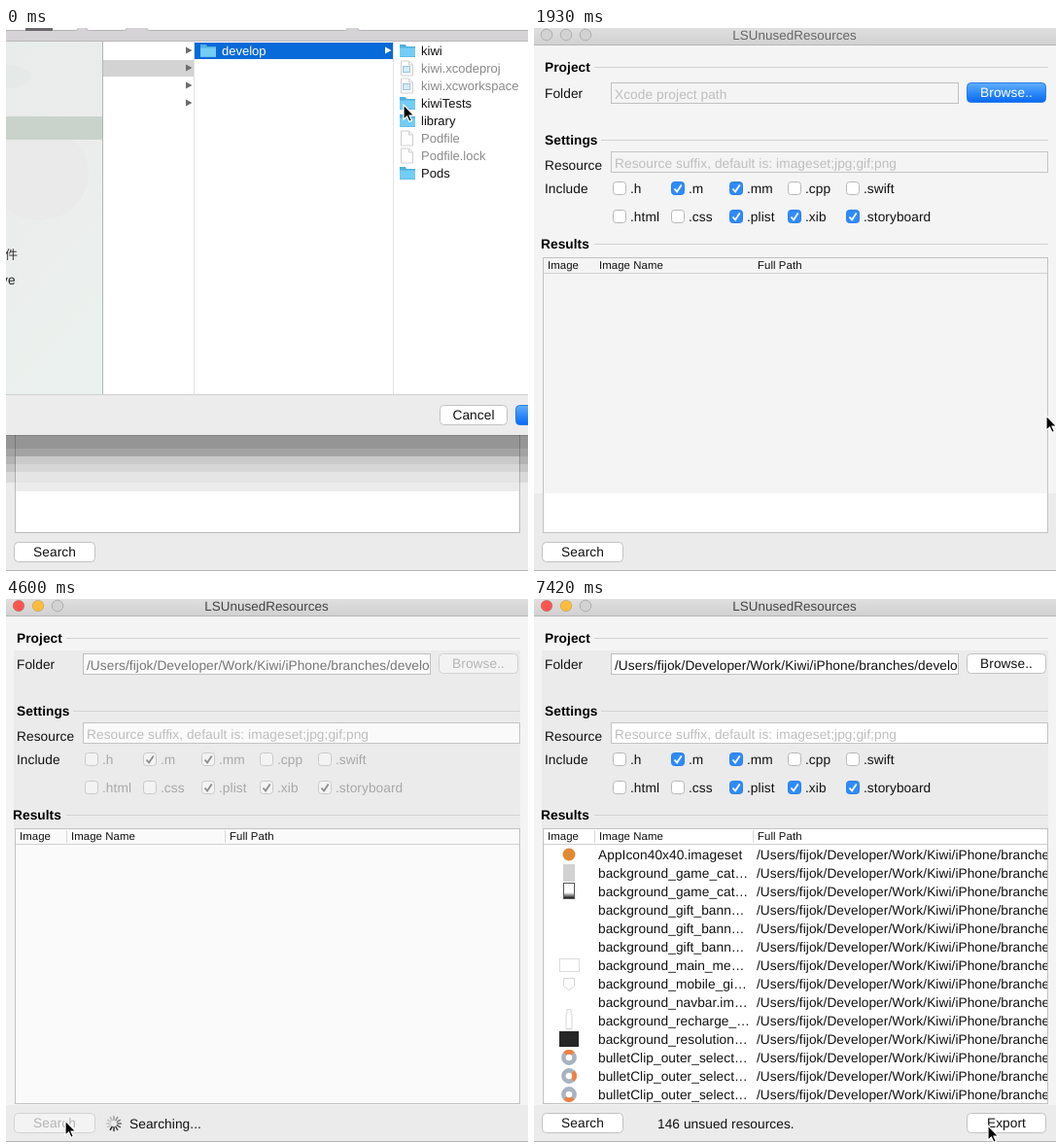
An HTML page that plays this animation: 537x559 px, repeating every 8000 ms.

```html
<!DOCTYPE html>
<html>
<head>
<meta charset="utf-8">
<style>
html, body { margin: 0; width: 100%; height: 100%; overflow: hidden; background: #f4f4f4; }
svg { display: block; }
text { font: 13.7px "Liberation Sans", Arial, sans-serif; letter-spacing: .07px; white-space: pre; text-rendering: geometricPrecision; }
.b { font-weight: bold; }
.s { font-size: 11.4px; }
.t { font-size: 13px; letter-spacing: 0; }
.w { font-size: 13.4px; }
.c { text-anchor: middle; }
.cjk { font-family: "Noto Sans CJK SC", "Noto Sans CJK", sans-serif; }
</style>
</head>
<body>
<svg id="stage" width="537" height="559" viewBox="0 0 537 559">
  <defs>
    <linearGradient id="bar" x2="0" y2="1"><stop stop-color="#e0dfe0"/><stop offset="1" stop-color="#d2d1d2"/></linearGradient>
    <linearGradient id="blue" x2="0" y2="1"><stop stop-color="#62b0fb"/><stop offset=".5" stop-color="#2f8bf9"/><stop offset="1" stop-color="#0a68f2"/></linearGradient>
    <linearGradient id="side" x2=".3" y2="1"><stop stop-color="#e8ecea"/><stop offset=".5" stop-color="#ebedec"/><stop offset="1" stop-color="#ebf1ee"/></linearGradient>
    <linearGradient id="fade" x2="0" y2="1"><stop offset=".6" stop-color="#fff"/><stop offset="1" stop-color="#000"/></linearGradient>
  </defs>
  <g id="scene"></g>
  <g id="spinner"></g>
  <path id="cursor" d="M0 0V15.2L3.5 12L6 17.4L8.4 16.3L6 11.1H10.8Z" stroke="#fff" stroke-width="1.2"/>
</svg>
<script>
const FRAME = 8000 / 54;
const PATH = "/Users/fijok/Developer/Work/Kiwi/iPhone/branches/develop";
const $ = id => document.getElementById(id);
const list = (items, fn) => items.map(fn).join("");

const rect = (x, y, w, h, fill, more = "") =>
  `<rect x="${x}" y="${y}" width="${w}" height="${h}" fill="${fill}" ${more}/>`;
const box = (x, y, w, h, fill, line, r = 0) =>
  rect(x + .5, y + .5, w - 1, h - 1, fill, `stroke="${line}" rx="${r}"`);
const text = (x, y, s, fill = "#111", cls = "") =>
  `<text x="${x}" y="${y}" fill="${fill}" class="${cls}">${s}</text>`;
const shape = (d, fill, more = "") => `<path d="${d}" fill="${fill}" ${more}/>`;
const disc = (x, y, r, fill, more = "") => `<circle cx="${x}" cy="${y}" r="${r}" fill="${fill}" ${more}/>`;
const clip = (x, y, w, h, s) =>
  `<svg x="${x}" y="${y}" width="${w}" height="${h}" viewBox="${x} ${y} ${w} ${h}">${s}</svg>`;

function button(x, y, w, label, look = "on") {
  const [fill, line, ink] = {
    on: ["#fff", "#c2c2c2", "#111"],
    off: ["#f3f3f3", "#d2d2d2", "#b4b4b4"],
    main: ["url(#blue)", "#2a7fe6", "#fff"]
  }[look];
  return box(x, y, w, 21, fill, line, 4) + text(x + w / 2, y + 15, label, ink, "c");
}

function check(x, y, label, on, off) {
  const blue = on && !off;
  return box(x, y, 14, 14, blue ? "#2f8bf9" : off ? "#f3f3f3" : "#fff", blue ? "#2a80ea" : off ? "#cacaca" : "#b8b8b8", 3) +
    (on ? shape(`M${x + 3.5} ${y + 7.5}l2.6 3l4.6-7`, "none", `stroke="${off ? "#8c8c8c" : "#fff"}" stroke-width="1.8"`) : "") +
    text(x + 18, y + 12, label, off ? "#a8a8a8" : "#111");
}

const folder = (x, y) =>
  shape(`M${x} ${y + 1}h6l1 2h9v11h-16z`, "#4fb0e0") + rect(x, y + 4.5, 16, 9, "#74cdf5");
const sheet = (x, y, mark) =>
  shape(`M${x + 2.5} ${y}h8l4 4v11h-12zM${x + 10.5} ${y}v4h4`, "#fff", `stroke="#cfcfcf"`) +
  (mark ? box(x + 4, y + 5, 8, 7, "#d9ebf6", "#9cc4dd") : "");
const arrow = (x, y, fill) => shape(`M${x} ${y - 3.5}v7l6.5-3.5z`, fill);

function dialog() {
  const files = ["kiwi", "kiwi.xcodeproj", "kiwi.xcworkspace", "kiwiTests", "library", "Podfile", "Podfile.lock", "Pods"];
  const shades = [[419, 14, "#959595"], [433, 8, "#a3a3a3"], [441, 8, "#b3b3b3"], [449, 8, "#c5c5c5"], [457, 11, "#d9d9d9"], [468, 91, "#eaebea"]];
  return rect(0, 0, 537, 14, "#d5d3d5") +
    list([[-9, 84], [82, 43], [144, 208], [361, 190]], ([x, w]) => box(x, -9, w, 12, "#fdfdfd", "#b4b2b4", 3)) +
    rect(20, 0, 28, 3, "#6b696b") + rect(0, 13, 537, 1, "#b9b7b9") +
    rect(0, 14, 537, 363, "#fff") + rect(0, 14, 99, 363, "url(#side)") +
    clip(0, 14, 99, 363, `<ellipse cx="34" cy="150" rx="51" ry="48" fill="#e9eae9"/>` +
      `<ellipse cx="0" cy="50" rx="25" ry="12" fill="#e5e9e7"/>`) +
    rect(0, 91, 99, 24, "#c9d3cc") + rect(99, 14, 1, 363, "#b2b5b3") +
    text(-1, 238, "件", "#333", "cjk t") + text(-5, 264, "ve", "#222") +
    rect(100, 33, 93, 17, "#d4d3d4") +
    list([23, 41, 59, 77], y => arrow(185, y, "#6c6c6c")) +
    rect(193, 14, 1, 363, "#e2e2e2") + rect(398, 14, 1, 363, "#e2e2e2") +
    rect(194, 15, 204, 17, "#0869d9") + folder(200, 16) + text(222, 28, "develop", "#fff", "t") + arrow(390, 23, "#fff") +
    list(files, (name, i) => {
      const y = 16 + i * 18, file = /\.|file/.test(name);
      return (file ? sheet(404, y, name[0] == "k") : folder(405, y)) +
        text(427, y + 12, name, file ? "#8a8a8a" : "#111", "t");
    }) +
    rect(0, 377, 537, 42, "#ececec") + rect(0, 377, 537, 1, "#cfcfcf") +
    button(446, 388, 70, "Cancel") + box(524, 388, 70, 21, "url(#blue)", "#2a7fe6", 4) +
    list(shades, ([y, h, c]) => rect(0, y, 537, h, c)) +
    rect(10, 441, 518, 27, "#fff", `opacity=".3"`) +
    rect(10, 477, 518, 42, "#fff") + rect(0, 419, 537, 1, "#808080") +
    shape("M9.5 419V519.5H528.5V419", "none", `stroke="#000" stroke-opacity=".2"`) +
    button(8, 529, 84, "Search") + rect(0, 558, 537, 1, "#b5b5b5");
}

function results() {
  const names = ["AppIcon40x40.imageset", ...["game_cat", "game_cat", "gift_bann", "gift_bann", "gift_bann", "main_me",
    "mobile_gi", "navbar.im", "recharge_", "resolution"].map(s => "background_" + s + "…"), ...Array(3).fill("bulletClip_outer_select…")];
  const pale = `stroke="#d6d6d6"`;
  const ring = (y, turn) => disc(36, y, 5.6, "none", `stroke="#a9b3c0" stroke-width="4.6"`) +
    shape("M-4 -4A5.6 5.6 0 0 1 4 -4", "none", `stroke="#f0803c" stroke-width="4.6" transform="translate(36 ${y}) rotate(${turn})"`);
  return disc(36, 263, 6.5, "#e08a34") +
    rect(30, 273, 12, 18, "#d2d2d2") + box(30, 292, 12, 17, "url(#fade)", "#555") +
    box(26, 370, 21, 14, "#fff", "#dcdcdc") +
    shape("M30.5 390.5h11v8l-5.5 4l-5.5-4z", "#fff", pale) +
    shape("M34 422.5h4v4l1 2v14h-6v-14l1-2z", "#fff", pale) +
    rect(26, 445, 20, 16, "#262626") +
    ring(472, 0) + ring(491, 90) + ring(510, 180) +
    clip(10, 253, 518, 266, list(names, (s, i) => text(66, 268 + 19 * i, s) + text(229, 268 + 19 * i, PATH)));
}

// mode: empty (inactive), picked, ready, busy, done
function mainWindow(mode) {
  const empty = mode == "empty", busy = mode == "busy", done = mode == "done";
  const focus = mode == "picked" || mode == "ready", late = busy || done;
  const table = done ? "#fff" : busy ? "#fafafa" : "#f4f4f4";
  const field = done ? "#fff" : late ? "#fafafa" : "#f4f4f4";
  const lights = empty ? ["#d2d2d2", "#d2d2d2", "#d2d2d2"] : ["#fc5650", "#fdbc3c", "#d2d2d2"];
  const head = (x, y, s, from) => text(x, y, s, "#000", "b") + rect(from, y - 5, 529 - from, 1, "#d2d2d2");
  const bandTop = empty || mode == "picked" ? 479 : 521;
  let s = rect(0, 0, 537, 559, "#f4f4f4") + rect(0, 0, 537, 17, "url(#bar)") + rect(0, 17, 537, 1, "#b6b6b6") +
    list(lights, (c, i) => disc(13 + 20 * i, 7, 5.8, c, `stroke="${c == "#d2d2d2" ? "#b0b0b0" : "#0002"}"`)) +
    text(268, 12, "LSUnusedResources", empty ? "#666" : "#444", "c w") +
    (late ? rect(8, 53, 521, 183, "#ebebeb") : "") + rect(0, bandTop, 537, 559 - bandTop, "#ebebeb") +
    head(11, 45, "Project", 62) + head(11, 120, "Settings", 69) + head(7, 227, "Results", 62) +
    text(11, 72, "Folder") + text(11, 146, "Resource") + text(11, 170, "Include");

  if (focus) s += rect(76.5, 53.5, 363, 27, "#82b8ee", `rx="3"`);
  s += box(79, 56, 358, 22, field, focus ? "#5d9fe0" : "#c0c0c0");
  if (focus) s += rect(82, 59, 354, 16, "#b3d7ff");
  s += clip(80, 57, 355, 20, empty ? text(83, 73, "Xcode project path", "#bebebe") : text(83, 73, PATH, busy ? "#777" : "#111")) +
    box(79, 127, 450, 22, field, "#c4c4c4") +
    text(83, 144, "Resource suffix, default is: imageset;jpg;gif;png", "#bebebe") +
    button(445, 56, 82, "Browse..", empty ? "main" : busy ? "off" : "on");

  const rows = [[".h", "*.m", "*.mm", ".cpp", ".swift"], [".html", ".css", "*.plist", "*.xib", "*.storyboard"]];
  s += list(rows, (row, j) => list(row, (name, i) =>
    check(81 + 60 * i, 158 + 29 * j, name.replace("*", ""), name[0] == "*", busy)));

  s += box(9, 236, 520, 284, table, "#c2c2c2");
  if (bandTop == 479) s += rect(10, 479, 518, 40, "#fff");
  s += rect(10, 252, 518, 1, "#d0d0d0") +
    (late ? rect(62, 238, 1, 13, "#d8d8d8") + rect(225, 238, 1, 13, "#d8d8d8") : "") +
    text(14, 248, "Image", "#111", "s") + text(67, 248, "Image Name", "#111", "s") + text(230, 248, "Full Path", "#111", "s") +
    button(8, 529, 84, "Search", busy ? "off" : "on");
  if (busy) s += text(127, 545, "Searching...");
  if (done) s += results() + text(127, 545, "146 unsued resources.") + button(445, 529, 82, "Export");
  return s + rect(0, 558, 537, 1, "#b5b5b5");
}

const modes = [[0, "dialog"], [13, "empty"], [14, "picked"], [16, "ready"], [31, "busy"], [43, "done"]];
const stops = [[0, 409, 79], [8, 525, 408], [11, 527, 399], [15, 527, 399], [23, 64, 516], [28, 61, 537],
  [31, 61, 537], [38, 382, 507], [46, 382, 507], [50, 467, 542], [54, 467, 542]];

function pointer(n) {
  const i = stops.findIndex(p => p[0] > n);
  const [a, x, y] = stops[i - 1], [b, x2, y2] = stops[i];
  const u = (n - a) / (b - a), e = u * u * (3 - 2 * u);
  return [x + (x2 - x) * e, y + (y2 - y) * e];
}

$("spinner").innerHTML = list([...Array(12).keys()], i =>
  `<line y1="-3.8" y2="-7.4" stroke="#222" stroke-width="1.5" stroke-linecap="round" opacity="${Math.max(.2, 1 - i * .09)}" transform="rotate(${-30 * i})"/>`);

let shown;
function draw(now) {
  const n = Math.floor(now % 8000 / FRAME);
  const mode = modes.filter(m => m[0] <= n).pop()[1];
  if (mode != shown) {
    $("scene").innerHTML = mode == "dialog" ? dialog() : mainWindow(mode);
    shown = mode;
  }
  $("spinner").setAttribute("visibility", mode == "busy" ? "visible" : "hidden");
  $("spinner").setAttribute("transform", `translate(111 540) rotate(${Math.floor(n * 1.8) * 30})`);
  $("cursor").setAttribute("transform", `translate(${pointer(n).map(Math.round)})`);
}

const start = performance.now();
draw(0);
requestAnimationFrame(function tick() {
  draw(performance.now() - start);
  requestAnimationFrame(tick);
});
</script>
</body>
</html>
```
